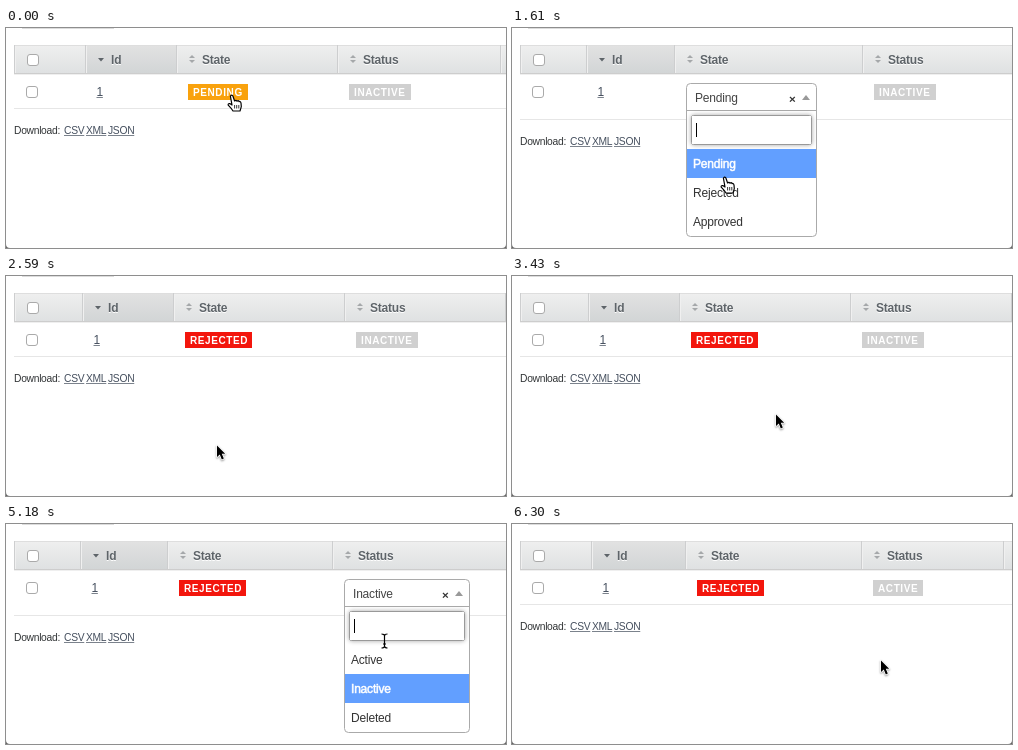
Recreate the animation shown at these times as an HTML page with a canvas. Size 500 by 220 pixels, loop 6.58 s.

```html
<!DOCTYPE html>
<html lang="en">
<head>
<meta charset="utf-8">
<title>Inline status editing</title>
<style>
html, body { margin: 0; width: 100%; height: 100%; overflow: hidden; background: #666; }
canvas { display: block; border-radius: 0 0 4px 4px; }
</style>
</head>
<body>
<canvas id="stage" width="500" height="220"></canvas>
<script>
const ctx = document.getElementById('stage').getContext('2d');
const LOOP = 6580, STEP = 70;
const FONT = '"Liberation Sans", Arial, sans-serif';

// Left edges of the Id, State, Status and following columns
const scenes = [
  { at: 0, cols: [79, 170, 331, 494], state: 'PENDING', status: 'INACTIVE' },
  { at: 70, cols: [74, 162, 350, 520], status: 'INACTIVE',
    edit: { x: 174, w: 131, items: ['Pending', 'Rejected', 'Approved'], from: 0, to: 1,
            open: 140, focus: 420, blur: 2310, close: 2450 } },
  { at: 2590, cols: [76, 167, 338, 499], state: 'REJECTED', status: 'INACTIVE' },
  { at: 4340, cols: [74, 161, 326, 520], state: 'REJECTED',
    edit: { x: 338, w: 126, items: ['Active', 'Inactive', 'Deleted'], from: 1, to: 0,
            open: 4410, focus: 4690, blur: 5670, close: 5740 } },
  { at: 5950, cols: [79, 173, 349, 491], state: 'REJECTED', status: 'ACTIVE' }
];

const labels = {
  PENDING: ['#f9a20d', 60], REJECTED: ['#f3160d', 67],
  INACTIVE: ['#d0d0d0', 62], ACTIVE: ['#d0d0d0', 50]
};

// Pointer path: time, x, y
const track = [
  [0, 226, 67], [840, 226, 67], [1540, 213, 145], [1960, 210, 168], [3290, 210, 168],
  [3430, 263, 137], [3990, 376, 75], [4270, 388, 71], [4900, 388, 71], [5180, 378, 117],
  [5600, 370, 133], [6160, 371, 131], [6300, 368, 135], [LOOP, 368, 135]
];

const arrow = new Path2D('M1 1.5V13L3.8 10.4 5.8 15.4 7.8 14.6 5.8 9.8H9.2Z');
const hand = new Path2D('M-1.6 1.2Q-.6-.6.8.8L2.6 6Q4 4.6 5 6.2Q6.4 5 7 6.6Q8.6 6 9 8' +
  'L9.3 11.5Q9 13 8 16H1Q-.5 13.5-3.8 10.2Q-4.2 8.2-2.2 8.6L0 10Z');
const knuckles = new Path2D('M2.6 10V13.5M4.7 10V13.5M6.8 10V13.5');
const beam = new Path2D('M-3-7Q0-7 0-5Q0-7 3-7M0-5V5M-3 7Q0 7 0 5Q0 7 3 7M-1.5 3H1.5');

function rect(x, y, w, h, color) {
  ctx.fillStyle = color;
  ctx.fillRect(x, y, w, h);
}

function box(x, y, w, h, radius, fill, line) {
  ctx.beginPath();
  ctx.roundRect(x + .5, y + .5, w - 1, h - 1, radius);
  ctx.fillStyle = fill;
  ctx.fill();
  ctx.strokeStyle = line;
  ctx.lineWidth = 1;
  ctx.stroke();
}

function text(str, x, y, size, color, weight = '', spacing = -.2) {
  ctx.font = `${weight} ${size}px ${FONT}`;
  ctx.letterSpacing = spacing + 'px';
  ctx.fillStyle = color;
  ctx.fillText(str, x, y);
}

function link(str, x, y, size) {
  text(str, x, y, size, '#46505f', '', -.3);
  rect(x, y + 1, ctx.measureText(str).width, 1, '#7b828c');
}

// Triangle with its base at y; a negative height points up
function triangle(x, y, half, height, color) {
  ctx.beginPath();
  ctx.moveTo(x - half, y);
  ctx.lineTo(x + half, y);
  ctx.lineTo(x, y + height);
  ctx.fillStyle = color;
  ctx.fill();
}

function shade(x, w, top, bottom) {
  const g = ctx.createLinearGradient(0, 17, 0, 45);
  g.addColorStop(0, top);
  g.addColorStop(1, bottom);
  rect(x, 17, w, 28, g);
}

function drawTable({ cols, state, status, edit }) {
  rect(0, 0, 500, 220, '#fff');
  rect(16, 0, 92, 1, '#dcdcdc');

  shade(8, 492, '#efefef', '#dfe1e2');
  shade(cols[0], cols[1] - cols[0], '#e2e2e2', '#d2d5d6');
  rect(8, 17, 492, 1, '#dedede');
  rect(8, 45, 492, 1, '#cdcdcd');
  rect(8, 46, 492, 1, '#efefef');
  for (const x of [8, ...cols]) {
    rect(x, 17, 1, 28, '#cdcecf');
    rect(x + 1, 18, 1, 27, '#f0f0f0');
  }
  box(21, 26, 12, 12, 2.5, '#fff', '#aaa');
  box(20, 58, 12, 12, 2.5, '#fff', '#aaa');

  ['Id', 'State', 'Status'].forEach((name, i) => {
    const x = cols[i];
    text(name, x + 26, 37, 12, '#fff', 'bold');
    text(name, x + 26, 36, 12, '#5e6469', 'bold');
    if (i) {
      triangle(x + 16, 30, 3, -3, '#a5a8aa');
      triangle(x + 16, 32, 3, 3, '#a5a8aa');
    } else triangle(x + 16, 30, 3, 3.5, '#5e6469');
  });

  link('1', cols[0] + 11.5, 68, 12);
  [state, status].forEach((name, i) => {
    if (!name) return;
    const [color, width] = labels[name], x = cols[i + 1] + 12;
    rect(x, 56, width, 16, color);
    text(name, x + 5, 68, 10, '#fff', 'bold', .6);
  });

  const shift = edit ? 11 : 0;
  rect(8, 80 + shift, 492, 1, '#e6e6e6');
  text('Download:', 8, 106 + shift, 10.3, '#323537', '', -.3);
  link('CSV', 58, 106 + shift, 10.3);
  link('XML', 80, 106 + shift, 10.3);
  link('JSON', 102, 106 + shift, 10.3);
}

function drawSelect({ x, w, items, from, to, open, focus, blur, close }, t, pointerY) {
  const opened = t >= open && t < close;
  box(x, 55, w, opened ? 154 : 28, 4, '#fff', '#aaa');
  text(items[t < close ? from : to], x + 9, 74, 12, '#444');
  text('×', x + w - 28, 75, 11.5, '#333', 'bold');
  triangle(x + w - 11, opened ? 72 : 68, 4, opened ? -5 : 5, '#999');
  if (!opened) return;

  rect(x + 1, 82, w - 2, 1, '#aaa');
  const focused = t < blur;
  ctx.save();
  if (focused) {
    ctx.shadowColor = `rgba(0,0,0,${.3 * Math.min(1, (t - open) / (focus - open))})`;
    ctx.shadowBlur = 4;
  }
  box(x + 5, 87, w - 10, 30, focused ? 2 : 0, '#fff', focused ? '#999' : '#aaa');
  ctx.restore();
  rect(x + 6, 88, w - 12, 28, '#fff');
  if (focused && Math.max(0, Math.floor((t - focus) / 500)) % 2 === 0)
    rect(x + 10, 95, 1, 14, '#000');

  const hot = pointerY < 121 ? from : Math.floor((pointerY - 121) / 29);
  items.forEach((item, i) => {
    const y = 121 + 29 * i;
    if (i === hot) rect(x + 1, y, w - 2, 29, '#629fff');
    else if (i === from) rect(x + 1, y, w - 2, 29, '#e0e0e0');
    text(item, x + 7, y + 19, 12, i === hot ? '#fff' : '#333');
    if (i === hot) {
      ctx.strokeStyle = '#fff';
      ctx.lineWidth = .5;
      ctx.strokeText(item, x + 7, y + 19);
    }
  });
}

function pointerAt(t) {
  const i = track.findIndex(key => key[0] > t);
  const [t0, x0, y0] = track[i - 1], [t1, x1, y1] = track[i];
  const k = (t - t0) / (t1 - t0);
  return [x0 + (x1 - x0) * k, y0 + (y1 - y0) * k];
}

function drawPointer(x, y, edit, t) {
  ctx.save();
  ctx.translate(Math.round(x), Math.round(y));
  ctx.lineJoin = 'round';
  const opened = edit && t >= edit.open && t < edit.close;
  if (opened && y > 87 && y < 118) {
    ctx.translate(.5, 0);
    ctx.lineWidth = 1.2;
    ctx.strokeStyle = '#000';
    ctx.stroke(beam);
  } else if (t < 70 || edit && t < edit.close) {
    ctx.lineWidth = 1.2;
    ctx.fillStyle = '#fff';
    ctx.strokeStyle = '#000';
    ctx.fill(hand);
    ctx.stroke(hand);
    ctx.lineWidth = .8;
    ctx.stroke(knuckles);
  } else {
    ctx.shadowColor = 'rgba(0,0,0,.4)';
    ctx.shadowBlur = 2;
    ctx.shadowOffsetY = 1;
    ctx.lineWidth = 1.6;
    ctx.strokeStyle = '#fff';
    ctx.stroke(arrow);
    ctx.shadowColor = 'transparent';
    ctx.fillStyle = '#000';
    ctx.fill(arrow);
  }
  ctx.restore();
}

const start = performance.now();
function render() {
  const elapsed = (performance.now() - start) % LOOP;
  const t = Math.floor(elapsed / STEP) * STEP;
  const scene = scenes.findLast(s => s.at <= t);
  const [x, y] = pointerAt(t);
  drawTable(scene);
  if (scene.edit) drawSelect(scene.edit, t, y);
  drawPointer(x, y, scene.edit, t);
  requestAnimationFrame(render);
}
render();
</script>
</body>
</html>
```
